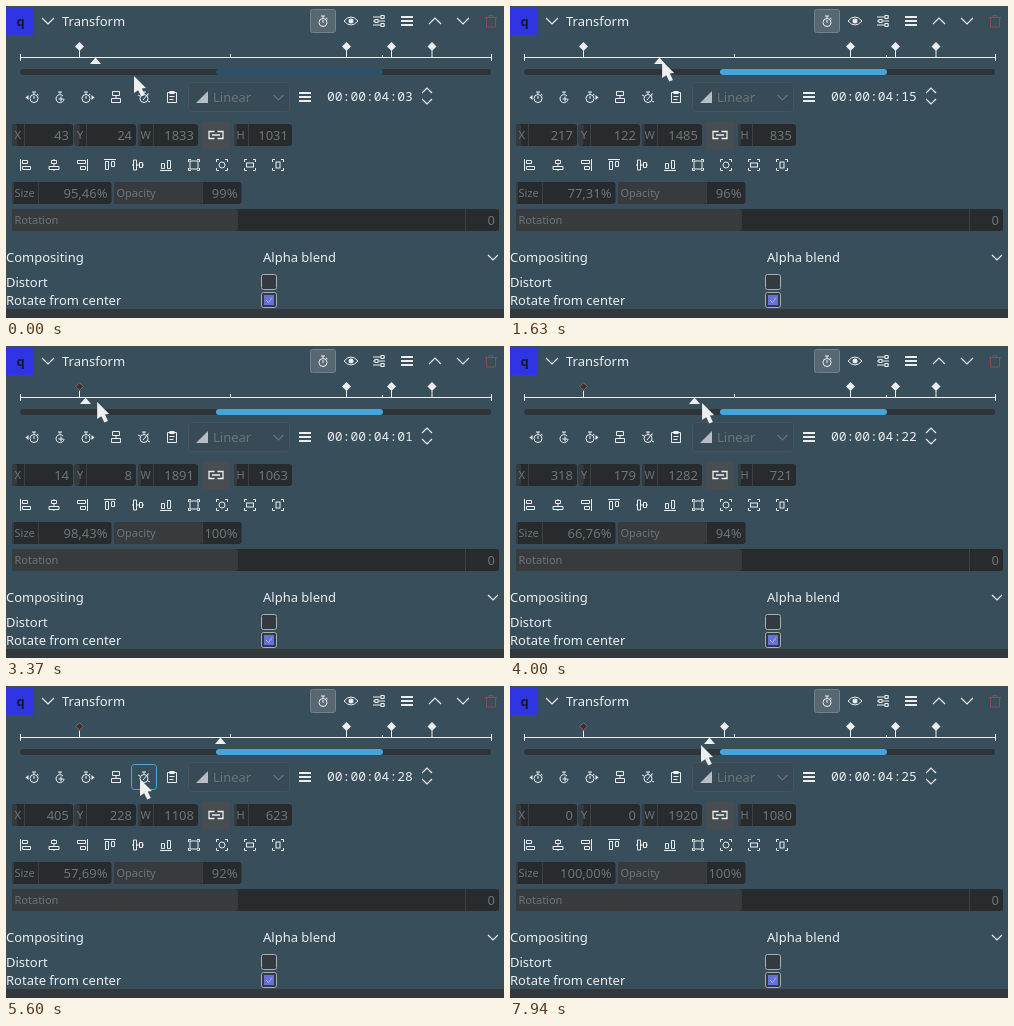
Recreate the animation shown at these times as an HTML page. Size 498x312 px, loop 8000 ms.

```html
<!DOCTYPE html>
<html lang="en">
<head>
<meta charset="utf-8">
<title>Transform panel</title>
<style>
  html, body { margin: 0; width: 100%; height: 100%; overflow: hidden; background: #384e5b; }
  svg { display: block; width: 498px; height: 312px; }
  text { font: 13px "Noto Sans", sans-serif; fill: #eceff0; white-space: pre; }
  .mono { font-family: "Noto Sans Mono", "DejaVu Sans Mono", monospace; }
  .small { font-size: 11px; }
  .end { text-anchor: end; }
  .ink { fill: none; stroke: #eceff0; }
  .solid { fill: #eceff0; }
  .field { fill: #272b2e; }
  .fill { fill: #373b3e; }
  .rule { stroke: #3b4044; }
  .dim { fill: #6c757a; }
  .dimInk { fill: none; stroke: #65737c; }
  .combo { fill: #374a56; stroke: #46545d; }
  .link { fill: #484d51; stroke: #454b50; }
  .on .field { fill: #212427; }
  .on .fill { fill: #3b3f42; }
  .on .rule { stroke: none; }
  .on .dim { fill: #eceff0; }
  .on .label { fill: #aeb4b7; }
  .on .dimInk { stroke: #aeb8bd; }
  .on .combo { stroke: none; }
  .on .link { fill: #33434d; stroke: #66737b; }
</style>
</head>
<body>
<svg id="stage" viewBox="0 0 498 312" xmlns="http://www.w3.org/2000/svg"></svg>
<script>
const stage = document.getElementById('stage');
const LOOP = 8000;

const rect = (x, y, w, h, attrs = '') => `<rect x="${x}" y="${y}" width="${w}" height="${h}" ${attrs}/>`;
const path = (d, attrs = 'class="ink"') => `<path d="${d}" ${attrs}/>`;
const text = (x, y, str, cls = '', id = '') => `<text x="${x}" y="${y}" class="${cls}" id="${id}">${str}</text>`;
const at = (x, y, body, attrs = '') => `<g transform="translate(${x} ${y})" ${attrs}>${body}</g>`;
const turn = (angle, body) => `<g transform="rotate(${angle})">${body}</g>`;
const chevron = (x, y, w, h, cls = 'ink') =>
  path(`M${x - w} ${y - h / 2}L${x} ${y + h / 2}L${x + w} ${y - h / 2}`, `class="${cls}" stroke-width="1.2"`);
const menu = (x, y) => path(`M${x - 6} ${y - 4}h12m-12 4h12m-12 4h12`, 'class="ink" stroke-width="1.8"');

const watch = (hand = 'M0 2V-1') =>
  `<circle cy="1.5" r="4" class="ink"/>` + path('M-2 -5h4M0 -5v2M3 -3l1.5 1') + path(hand);

// Header
function header() {
  return rect(0, 2, 28, 27, 'fill="#2f35e2"')
    + '<text x="10.5" y="20" style="font-weight:700;fill:#15192f">q</text>'
    + chevron(42, 15, 6, 6) + text(56, 20, 'Transform')
    + rect(304.5, 3.5, 25, 23, 'rx="2" fill="#586873" stroke="#72818a"')
    + at(317, 15, watch())
    + at(345, 15, path('M-7 0Q0 -8 7 0Q0 8 -7 0Z') + '<circle r="2.5" class="solid"/>')
    + at(373, 15, path('M-6 -4h8m3 0h1M-6 0h2m3 0h7M-6 4h8m3 0h1')
      + rect(2, -5.5, 3, 3, 'class="ink"') + rect(-4, -1.5, 3, 3, 'class="ink"') + rect(2, 2.5, 3, 3, 'class="ink"'))
    + menu(401, 15) + chevron(429, 15, 6, -6) + chevron(457, 15, 6, 6)
    + at(485, 15, path('M-6 -3.5h12M-4.5 -3.5V6h9V-3.5M-2 -3.5v-2h4v2', 'fill="none" stroke="#8f4b52"'));
}

const diamond = 'M0 -4.5L4.5 0L0 4.5L-4.5 0Z';
const keyframe = (x, id) => at(x, 40.5,
  path('M0 4V11') + path(diamond, `class="solid" id="${id}mark"`), `id="${id}"`);

function ruler() {
  return path('M14 51.5H485.5M14.5 48v7M485.5 48v7M224.5 48v3M376.5 49v2')
    + ['first', 'added', 'c', 'd', 'e'].map((id, i) => keyframe([73.5, 214.5, 340.5, 385.5, 426][i], id)).join('')
    + path('M0 51.5L5.5 58H-5.5Z', 'class="solid" id="playhead"')
    + rect(14, 63, 471, 6, 'rx="3" fill="#2f3439"')
    + rect(210, 63, 167, 6, 'rx="3" id="zoom"');
}

function toolbar() {
  const arrow = (x, s) => path(`M${x} -2l${3 * s} 2.5l${-3 * s} 2.5Z`, 'class="solid"');
  return rect(125.5, 78.5, 25, 25, 'rx="3" id="button"')
    + at(28, 91, watch()) + at(26, 91, arrow(-3.5, -1))
    + at(54, 91, path('M3 -1A4 4 0 1 0 4 2M-2 -5h4M0 -5v2') + path('M-1.5 2h5') + path('M1 -.5v5', 'class="ink" id="plus"'))
    + at(80, 91, watch()) + at(82, 91, arrow(3.5, 1))
    + at(110, 91, path('M-3.5 -5.5h7v4h-7ZM0 -1.5v3M-4.5 1.5h9v4h-9Z'))
    + at(138, 91, watch('M-1 3L4.5 -3.5') + path('M-6 -2l2 1M4 4l2 1'))
    + at(166, 91, path('M-4.5 -4.5h9v10h-9ZM-2.5 -.5h5m-5 3h4') + rect(-2.5, -6, 5, 3, 'class="solid"'))
    + rect(182.5, 76.5, 101, 29, 'rx="3" class="combo"')
    + path('M190 97H202V85Z', 'fill="#b4bec4"') + text(207, 96, 'Linear', 'dim')
    + chevron(272.5, 91.5, 5, 5, 'dimInk')
    + menu(299, 91) + text(321, 95, '', 'mono', 'clock')
    + chevron(421, 84.5, 5, -5) + chevron(421, 95.5, 5, 5);
}

function field(x, y, w, name, split, id, fill, cls = '') {
  return rect(x, y, w, 22, 'rx="3" class="field"')
    + rect(x, y, fill, 22, 'rx="3" class="fill"')
    + path(`M${split + .5} ${y}v22`, 'class="rule"')
    + text(x + 2.5, y + 15, name, 'dim label small')
    + text(x + w - 4, y + 16, '', 'dim end', id);
}

function alignRow() {
  const left = path('M-5.5 -6V6M-3.5 -4.5h5v3h-5ZM-3.5 1.5h8v3h-8Z');
  const middle = path('M0 -6v1.5M0 -1.5v3M0 4.5V6M-2.5 -4.5h5v3h-5ZM-5 1.5h10v3h-10Z');
  const corners = path('M-5.5 -3v-2.5h2.5M3 -5.5h2.5V-3M5.5 3v2.5H3M-3 5.5h-2.5V3');
  const box = (w, h) => corners + rect(-w / 2, -h / 2, w, h, 'class="ink"');
  const icons = [left, middle, turn(180, left), turn(90, left), turn(90, middle), turn(-90, left),
    box(8, 8), corners + '<circle r="3" class="ink"/>', box(7, 4), box(4, 6)];
  return icons.map((icon, i) => at(20 + 28 * i, 159, icon)).join('');
}

function fields() {
  return field(6, 118, 61, 'X', 18, 'x', 5) + field(68.5, 118, 61.5, 'Y', 80, 'y', 5)
    + field(132, 118, 60, 'W', 147, 'w', 3) + field(228, 118, 58, 'H', 242, 'h', 3)
    + rect(196.5, 115.5, 27, 28, 'rx="2" class="link"')
    + at(210, 129, path('M-1.5 -3.5h-5.5v7h5.5M1.5 -3.5h5.5v7h-5.5M-4 0h8', 'class="ink" stroke-width="1.3"'))
    + alignRow()
    + field(6, 176, 99.5, 'Size', 32, 'size', 2) + field(108, 176, 127.5, 'Opacity', 196, 'opacity', 88)
    + field(6, 203, 487, 'Rotation', 459, 'rotation', 226);
}

function options() {
  const check = y => rect(255.5, y + .5, 15, 15, 'rx="2" fill="#343b40" stroke="#a5afb4"');
  return text(0, 256, 'Compositing') + text(257, 256, 'Alpha blend') + chevron(487, 251.5, 5, 5)
    + text(0, 281, 'Distort') + check(268)
    + text(0, 299, 'Rotate from center') + check(286)
    + rect(258, 289, 10, 10, 'fill="#6870dc"') + path('M260 294l2.5 2.5L266 291.5', 'fill="none" stroke="#a9b0f4"')
    + rect(0, 303, 498, 9, 'fill="#33383c"');
}

stage.innerHTML = rect(0, 0, 498, 312, 'fill="#384e5b"') + header() + ruler() + toolbar() + fields() + options()
  + path('M0 0V17L4.2 14.2L7.2 20.6L10.8 19L7.8 12.6L12 12Z', 'fill="#eef0f0" id="cursor"');

const el = {};
stage.querySelectorAll('[id]').forEach(node => { if (node.id) el[node.id] = node; });
el.rotation.textContent = '0';

// Tracks: [time, value, ...]
const frameTrack = [[0, 3], [1140, 3], [1630, 15], [1910, 21], [2040, 21], [2740, 0], [3300, 0],
  [3370, 1], [4000, 22], [4400, 28], [7480, 28], [7900, 25]];
const cursorTrack = [[130, 128, 70], [670, 92, 56], [1140, 92, 56], [1630, 152, 55], [1910, 182, 56], [2040, 182, 56],
  [2780, 76, 56], [2880, 76, 56], [3090, 78, 57], [3230, 78, 57], [3370, 91, 56], [4000, 192, 57], [4420, 217, 58],
  [4560, 217, 58], [5250, 134, 93], [7000, 134, 93], [7400, 216, 58], [7470, 216, 58], [7940, 191, 59]];

function sample(track, t) {
  const i = track.findIndex(key => key[0] > t);
  if (i < 0) return track[track.length - 1].slice(1);
  if (i === 0) return track[0].slice(1);
  const [a, b] = [track[i - 1], track[i]];
  const k = (t - a[0]) / (b[0] - a[0]);
  return a.slice(1).map((v, n) => v + (b[n + 1] - v) * k);
}
const ramp = (t, from, to) => Math.min(1, Math.max(0, (t - from) / (to - from)));

function draw(t) {
  const frame = Math.round(sample(frameTrack, t)[0]);
  const [cx, cy] = sample(cursorTrack, t);
  const added = t >= 6700;
  const onKey = frame === 0 || (added && frame === 28);
  const selected = t >= 2740;
  const pull = added ? 0 : frame;

  stage.classList.toggle('on', onKey);
  el.cursor.setAttribute('transform', `translate(${cx} ${cy})`);
  el.playhead.setAttribute('transform', `translate(${74 + 5 * frame + .5} 0)`);
  el.added.style.display = added ? '' : 'none';
  el.plus.style.display = onKey ? 'none' : '';
  el.firstmark.setAttribute('style', selected ? 'fill:#35323a;stroke:#d0535a' : '');
  el.firstmark.setAttribute('transform', selected ? 'scale(.85)' : '');

  const lit = ramp(t, 130, 300);
  const mix = (a, b) => Math.round(a + (b - a) * lit);
  el.zoom.setAttribute('fill', `rgb(${mix(43, 70)},${mix(80, 164)},${mix(105, 219)})`);

  const hover = ramp(t, 5150, 5250) * (1 - ramp(t, 7050, 7150));
  const press = ramp(t, 6640, 6740) * (1 - ramp(t, 7000, 7130));
  el.button.setAttribute('style',
    `fill:#439fd6;fill-opacity:${press};stroke:#4aa7df;stroke-opacity:${hover}`);

  const width = 1920 - 29 * pull;
  const height = Math.floor(width * 9 / 16);
  el.clock.textContent = '00:00:04:' + String(frame).padStart(2, '0');
  el.x.textContent = Math.floor(14.475 * pull);
  el.y.textContent = Math.floor(8.15 * pull);
  el.w.textContent = width;
  el.h.textContent = height;
  el.size.textContent = (height / 10.8).toFixed(2).replace('.', ',') + '%';
  el.opacity.textContent = Math.round(100 - pull * 2 / 7) + '%';
}

function tick(now) {
  draw(now % LOOP);
  requestAnimationFrame(tick);
}
draw(0);
requestAnimationFrame(tick);
</script>
</body>
</html>
```
